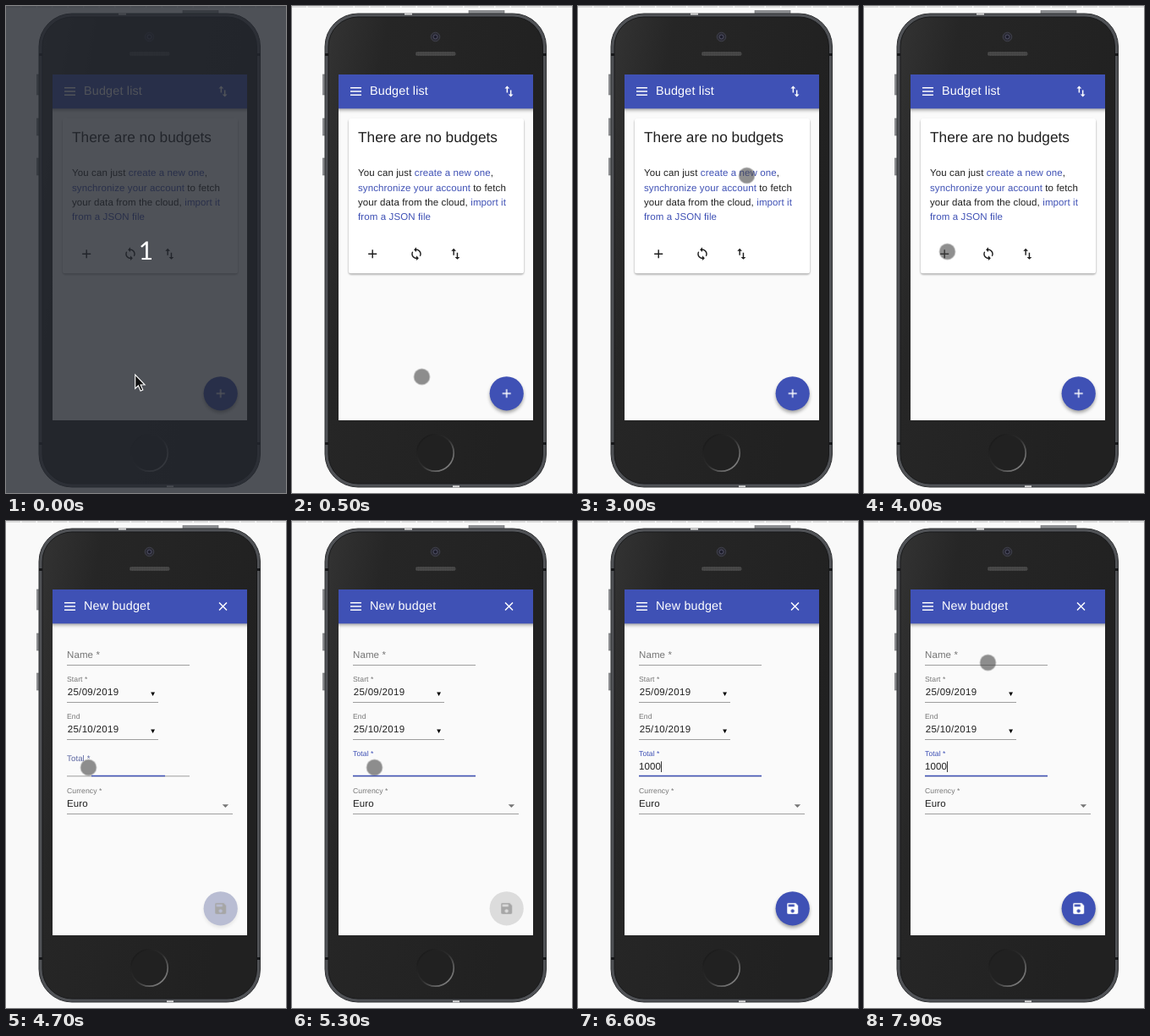
Write an HTML page that moves like this. It is 331 px wide and 576 px high and loops after 8000 ms.

```html
<!DOCTYPE html>
<html lang="en">
<head>
<meta charset="utf-8">
<title>Budget app</title>
<style>
html, body { margin: 0; width: 100%; height: 100%; overflow: hidden; background: #f9f9f9; }
svg { display: block; }
text { font: 11.5px "Liberation Sans", Arial, sans-serif; letter-spacing: .108px; fill: #1f1f1f; text-rendering: geometricPrecision; white-space: pre; }
.bar { font-size: 14.375px; letter-spacing: .18px; fill: #fff; }
.head { font-size: 17.25px; letter-spacing: 0; }
.link { fill: #3f51b5; }
.label { fill: #757575; }
.small { font-size: 8.625px; letter-spacing: .08px; }
.date { letter-spacing: .32px; }
.rule { stroke: #949494; stroke-width: .9; }
.soft { filter: blur(2px); }

/* every change is a hard step on one shared 8 s clock */
.a { animation: 8s step-end infinite; }
#intro { animation-name: intro; }
#list { animation-name: list; }
#form { animation-name: form; }
#dot { animation-name: dot; }
#fab { animation-name: fab; }
#lift { animation-name: lift; }
#save { animation-name: save; }
#total { animation-name: total; }
#focus { animation-name: focus; transform-origin: 144.5px 301.5px; }
#caret { animation-name: caret; }
#n1 { animation-name: n1; }
#n2 { animation-name: n2; }
#n3 { animation-name: n3; }
#n4 { animation-name: n4; }

@keyframes intro { 0% { opacity: 1 } 6.25%, 100% { opacity: 0 } }
@keyframes list { 0% { opacity: 1 } 57.5%, 100% { opacity: 0 } }
@keyframes form { 0% { opacity: 0 } 57.5%, 100% { opacity: 1 } }
@keyframes dot {
  0% { opacity: 0; transform: translate(153.5px, 438.5px) }
  6.25% { opacity: 1; transform: translate(153.5px, 438.5px) }
  8.75% { transform: translate(146px, 425px) }
  10% { transform: translate(137px, 409px) }
  11.25% { transform: translate(132.5px, 401.5px) }
  13.75% { transform: translate(113px, 290px) }
  15% { transform: translate(103.5px, 215.5px) }
  17.5% { transform: translate(109.5px, 224.5px) }
  20% { transform: translate(140px, 215px) }
  21.25% { transform: translate(176px, 204px) }
  22.5% { transform: translate(205.5px, 200.5px) }
  23.75% { transform: translate(195.5px, 208.5px) }
  37.5% { transform: translate(199.5px, 200.5px) }
  43.75% { transform: translate(102.5px, 293.5px) }
  46.25% { transform: translate(94px, 315.5px) }
  48.75% { transform: translate(95px, 304px) }
  50% { transform: translate(98.5px, 290.5px) }
  53.75% { transform: translate(97.5px, 291.5px) }
  67.5% { transform: translate(140px, 292.5px) }
  68.75% { opacity: 1; transform: translate(184.5px, 293.5px) }
  77.5% { opacity: 0; transform: translate(184.5px, 293.5px) }
  91.25% { opacity: 1; transform: translate(242.5px, 30.5px) }
  93.75% { transform: translate(173px, 104px) }
  97.5% { transform: translate(160px, 132px) }
  98.75%, 100% { opacity: 1; transform: translate(146.5px, 167.5px) }
}
@keyframes fab {
  0% { fill: #3f51b5 }
  57.5% { fill: #8089c2 }
  58.75% { fill: #b9bdd3 }
  60% { fill: #dcdcdc }
  80% { fill: #9299c8 }
  81.25% { fill: #5564bb }
  82.5%, 100% { fill: #3f51b5 }
}
@keyframes lift {
  0% { opacity: 1 }
  57.5% { opacity: .6 }
  58.75% { opacity: .25 }
  60% { opacity: 0 }
  80% { opacity: .4 }
  81.25% { opacity: .8 }
  82.5%, 100% { opacity: 1 }
}
@keyframes save { 0% { fill: #a6a6a6 } 77.5%, 100% { fill: #fff } }
@keyframes total {
  0% { fill: #757575; transform: translate(72px, 294.3px) scale(1) }
  58.75% { fill: #5a65a0; transform: translate(72px, 284px) scale(.84) }
  60%, 100% { fill: #3f51b5; transform: translate(72px, 278.2px) scale(.75) }
}
@keyframes focus {
  0% { transform: scaleX(0) }
  58.75% { transform: scaleX(.6) }
  60%, 100% { transform: scaleX(1) }
}
@keyframes caret {
  0% { opacity: 0; transform: none }
  60% { opacity: 1; transform: none }
  66.25% { opacity: 0; transform: none }
  72.5% { opacity: 1; transform: none }
  77.5% { transform: translateX(6.5px) }
  80% { transform: translateX(13px) }
  81.25% { transform: translateX(19.5px) }
  82.5% { opacity: 1; transform: translateX(26px) }
  91.25% { opacity: 0; transform: translateX(26px) }
  97.5%, 100% { opacity: 1; transform: translateX(26px) }
}
@keyframes n1 { 0% { fill: transparent } 77.5%, 100% { fill: #1f1f1f } }
@keyframes n2 { 0% { fill: transparent } 80%, 100% { fill: #1f1f1f } }
@keyframes n3 { 0% { fill: transparent } 81.25%, 100% { fill: #1f1f1f } }
@keyframes n4 { 0% { fill: transparent } 82.5%, 100% { fill: #1f1f1f } }
</style>
</head>
<body>
<svg width="331" height="576" viewBox="0 0 331 576">
  <defs>
    <linearGradient id="glass" x2="1" y2=".35">
      <stop offset="0" stop-color="#333"/>
      <stop offset=".25" stop-color="#262626"/>
      <stop offset="1" stop-color="#212121"/>
    </linearGradient>
    <linearGradient id="ring" x2="1" y2="1">
      <stop offset=".15" stop-color="#1c1c1c"/>
      <stop offset=".5" stop-color="#2c2c2c"/>
      <stop offset=".9" stop-color="#858585"/>
    </linearGradient>
    <pattern id="mesh" width="2" height="2" patternUnits="userSpaceOnUse">
      <rect width="2" height="2" fill="#4a4a4a"/>
      <rect width="1" height="1" fill="#3a3a3a"/>
    </pattern>
    <clipPath id="view"><rect x="55" y="81" width="230" height="409"/></clipPath>
    <!-- 24-unit icons, centred on the origin -->
    <g id="plus" transform="scale(.71875) translate(-12 -12)"><path d="M19 13h-6v6h-2v-6H5v-2h6V5h2v6h6z"/></g>
    <g id="swap" transform="scale(.71875) translate(-12 -12)"><path d="M9 3L5 6.99h3V14h2V6.99h3zM16 17.01V10h-2v7.01h-3L15 21l4-3.99z"/></g>
  </defs>

  <rect width="331" height="576" fill="#f9f9f9"/>
  <path d="M0 1H331" stroke="#dedede" stroke-width="2" stroke-dasharray="17 1.5"/>

  <!-- phone -->
  <g fill="#8d8f92" stroke="#6b6d70" stroke-width=".6">
    <rect x="36.4" y="81" width="4" height="24"/>
    <rect x="36.4" y="133" width="4" height="20"/>
    <rect x="36.4" y="180" width="4" height="20"/>
    <rect x="209" y="5.3" width="42" height="5"/>
  </g>
  <rect x="39" y="9" width="261.500" height="560" rx="39" fill="#505256" stroke="#2d2e30"/>
  <path d="M133 9.500h9M190 568.300h8" stroke="#d8d8d8" stroke-width="2"/>
  <path d="M39 57.500h5M295.500 57.500h5M39 517.500h5M295.500 517.500h5" stroke="#17181a" stroke-width="3"/>
  <rect x="43" y="13" width="253.500" height="552" rx="35" fill="url(#glass)" stroke="#18191a"/>
  <circle cx="169.500" cy="36.500" r="5.300" fill="#2b2b35" stroke="#41424c" stroke-width="1"/>
  <circle cx="169.500" cy="36.500" r="2.400" fill="#1d1d2b" stroke="#55556a" stroke-width=".9"/>
  <rect x="146" y="54" width="47.500" height="5" rx="2.500" fill="url(#mesh)"/>
  <circle cx="169.500" cy="528.500" r="21.700" fill="#212121" stroke="url(#ring)" stroke-width="1.700"/>

  <!-- app -->
  <g clip-path="url(#view)">
    <rect x="55" y="81" width="230" height="409" fill="#fafafa"/>
    <rect class="soft" x="52" y="84" width="236" height="39" fill="#000" opacity=".38"/>
    <rect x="55" y="81" width="230" height="40.300" fill="#3f51b5"/>
    <path d="M69 96.700h13M69 101h13M69 105.300h13" stroke="#fff" stroke-width="1.440"/>

    <g class="a" id="lift">
      <circle class="soft" cx="253.700" cy="461" r="19.800" opacity=".38"/>
    </g>
    <circle class="a" id="fab" cx="253.700" cy="458.300" r="20.100"/>

    <g class="a" id="list">
      <text class="bar" x="92" y="105.300">Budget list</text>
      <use href="#swap" x="256.500" y="101" fill="#fff"/>
      <rect x="67" y="134.500" width="207" height="183" rx="3" opacity=".38" style="filter: blur(.9px)"/>
      <rect x="67" y="133" width="207" height="183.300" rx="2.500" fill="#fff"/>
      <text class="head" x="78" y="161">There are no budgets</text>
      <text x="78" y="201">You can just <tspan class="link">create a new one</tspan>,</text>
      <text x="78" y="218.600"><tspan class="link">synchronize your account</tspan> to fetch</text>
      <text x="78" y="236">your data from the cloud, <tspan class="link">import it</tspan></text>
      <text class="link" x="78" y="253.200">from a JSON file</text>
      <g fill="#1f1f1f">
        <use href="#plus" x="95.200" y="293.200"/>
        <use href="#swap" x="193.300" y="293.300"/>
        <path transform="translate(147 293.200) scale(.71875) translate(-12 -12)" d="M12 4V1L8 5l4 4V6c3.310 0 6 2.690 6 6 0 1.010-.25 1.970-.7 2.800l1.460 1.460C19.540 15.030 20 13.570 20 12c0-4.420-3.580-8-8-8zm0 14c-3.310 0-6-2.690-6-6 0-1.010.25-1.970.7-2.800L5.240 7.740C4.460 8.970 4 10.430 4 12c0 4.420 3.580 8 8 8v3l4-4-4-4v3z"/>
      </g>
      <use href="#plus" x="253.700" y="458.300" fill="#fff"/>
    </g>

    <g class="a" id="form">
      <text class="bar" x="92" y="105.300">New budget</text>
      <path d="M252 96.500l9 9M261 96.500l-9 9" stroke="#fff" stroke-width="1.440"/>

      <text class="label" x="72" y="162.200">Name *</text>
      <path class="rule" d="M72 170.500H217"/>

      <text class="label small" x="72" y="190.200">Start *</text>
      <text class="date" x="72.700" y="206.200">25/09/2019</text>
      <path d="M171.200 202.400h4.800l-2.400 4.600z"/>
      <path class="rule" d="M72 214.500H180"/>

      <text class="label small" x="72" y="234.200">End</text>
      <text class="date" x="72.700" y="250.200">25/10/2019</text>
      <path d="M171.200 246.400h4.800l-2.400 4.600z"/>
      <path class="rule" d="M72 258.500H180"/>

      <text class="a" id="total">Total *</text>
      <path class="rule" d="M72 301.800H217"/>
      <path class="a" id="focus" d="M72 301.500H217" stroke="#3f51b5" stroke-width="1.600"/>
      <text x="72" y="294.300"><tspan class="a" id="n1">1</tspan><tspan class="a" id="n2">0</tspan><tspan class="a" id="n3">0</tspan><tspan class="a" id="n4">0</tspan></text>
      <path class="a" id="caret" d="M72.500 284.300V297" stroke="#1f1f1f" stroke-width=".9"/>

      <text class="label small" x="72" y="322.200">Currency *</text>
      <text x="72" y="338.300">Euro</text>
      <path d="M255.700 335.300h7.400l-3.700 3.700z" fill="#757575"/>
      <path class="rule" d="M72 346.500H268"/>

      <path class="a" id="save" transform="translate(253.700 458.300) scale(.71875) translate(-12 -12)" d="M17 3H5c-1.110 0-2 .9-2 2v14c0 1.100.89 2 2 2h14c1.100 0 2-.9 2-2V7l-4-4zm-5 16c-1.660 0-3-1.340-3-3s1.340-3 3-3 3 1.340 3 3-1.340 3-3 3zm3-10H5V5h10v4z"/>
    </g>
  </g>

  <circle class="a" id="dot" r="9.500" fill="#444" fill-opacity=".6"/>

  <!-- countdown -->
  <g class="a" id="intro">
    <rect width="331" height="576" fill="#24272f" opacity=".8"/>
    <text x="165.500" y="299.500" text-anchor="middle" style="font: 30px Lato, sans-serif; fill: #fff">1</text>
    <path d="M152.700 436.200v16.300l3.700-3.500 2.700 6.200 2.700-1.200-2.700-6h5z" fill="#111" stroke="#fff" stroke-width="1.100"/>
  </g>
</svg>
</body>
</html>
```
